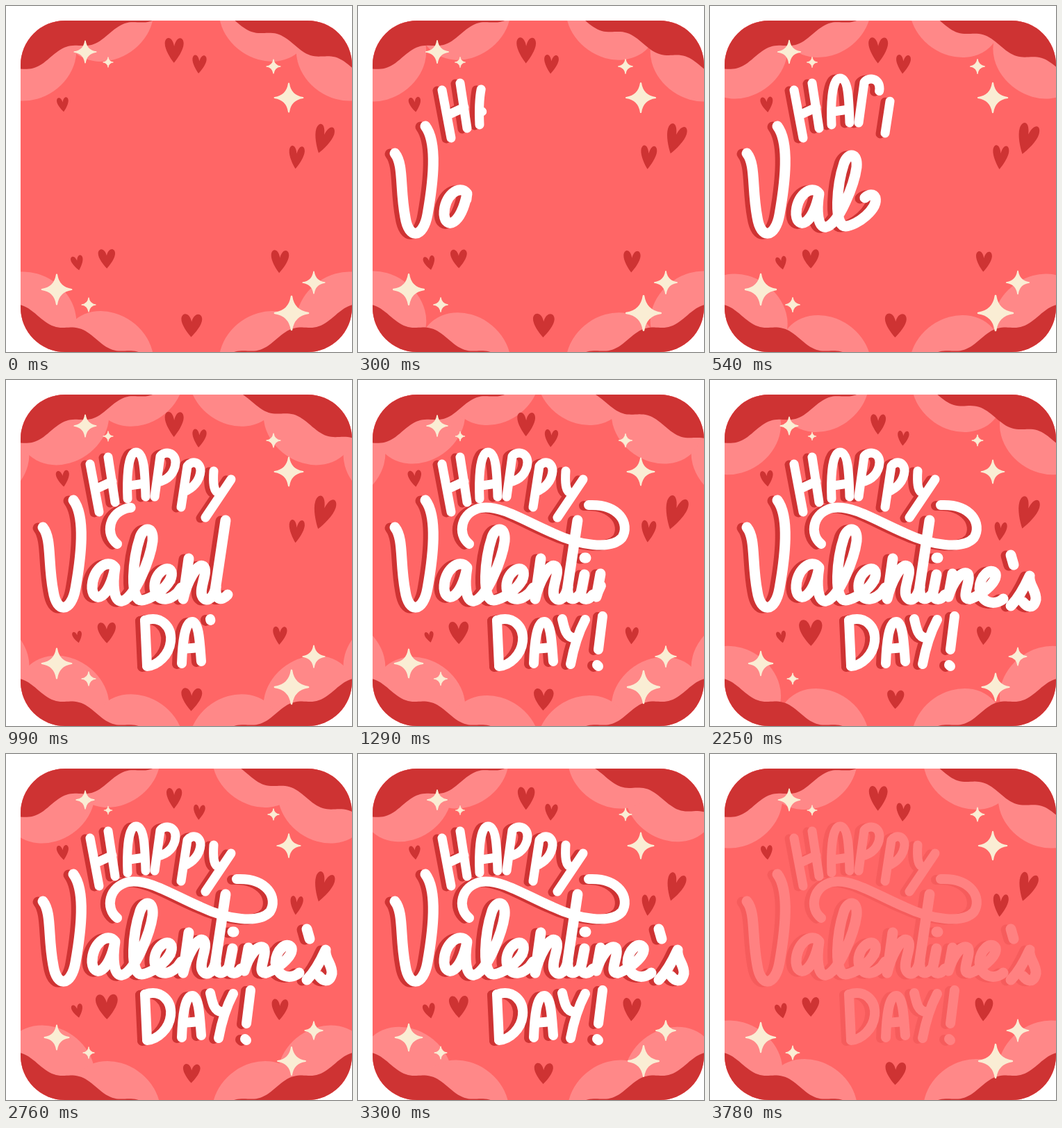
Write an HTML page that moves like this. It is 498 px wide and 498 px high and loops after 3.84 s.

```html
<!DOCTYPE html>
<html lang="en">
<head>
<meta charset="utf-8">
<title>Happy Valentine's Day</title>
<style>
html, body { margin: 0; height: 100%; overflow: hidden; background: #fff; }
svg { display: block; width: 498px; height: 498px; }
</style>
</head>
<body>
<svg viewBox="0 0 498 498">
  <defs>
    <clipPath id="card"><rect x="21" y="21" width="477" height="477" rx="64"/></clipPath>
    <g id="ink"></g>
  </defs>
  <g clip-path="url(#card)">
    <rect width="498" height="498" fill="#ff6666"/>
    <g id="corners"></g>
    <g id="hearts" fill="#ce3333"></g>
    <g id="stars" fill="#faedd4" stroke="#faedd4" stroke-width=".1" stroke-linejoin="round"></g>
  </g>
  <g id="lettering" fill="none" stroke-linecap="round" stroke-linejoin="round">
    <use href="#ink" x="-7" y="1" stroke="#ce3333"/>
    <use href="#ink" stroke="#fff"/>
  </g>
</svg>
<script>
const LOOP = 3840;
const FADE = 335;

const $ = id => document.getElementById(id);
function add(parent, tag, attrs) {
  const el = document.createElementNS('http://www.w3.org/2000/svg', tag);
  for (const name in attrs) el.setAttribute(name, attrs[name]);
  return parent.appendChild(el);
}

// Swings between -1 and 1, highest at `peak` ms
const sway = (t, peak, period = LOOP) => Math.cos((t - peak) * 2 * Math.PI / period);
const slow = t => sway(t, 1400);
const quick = t => sway(t, 1200, LOOP / 2);

// Scallops drift along the diagonal of each corner; all corners mirror the top left one
const nearDrift = t => 24 * quick(t) + 8 * slow(t);
const farDrift = t => 8 * quick(t) + 22 * slow(t);
const LOBES = [
  { x: -57, y: 125, drift: nearDrift },
  { x: 58, y: 68, drift: nearDrift },
  { x: 167, y: 12, drift: farDrift }
];
const corners = [
  { flip: '1 0 0 1 0 0', depth: 91, crest: () => 43 },
  { flip: '-1 0 0 1 519 0', depth: 89, crest: t => 72 - 16 * quick(t) },
  { flip: '1 0 0 -1 0 519', depth: 83, crest: () => 25 },
  { flip: '-1 0 0 -1 519 519', depth: 83, crest: () => 25 }
].map(corner => {
  const g = add($('corners'), 'g', { transform: `matrix(${corner.flip})` });
  const lobes = LOBES.map(() => add(g, 'ellipse', { rx: 69, ry: 58, fill: '#ff8888' }));
  return { ...corner, lobes, dark: add(g, 'path', { fill: '#ce3333' }) };
});

function wavePath(depth, crest) {
  let d = 'M0 0';
  for (let x = 0; x <= 240; x += 3) {
    const y = depth - 0.4 * (x - 21) + 6 * Math.cos((x - crest) * 2 * Math.PI / 84);
    d += `L${x} ${y.toFixed(1)}`;
  }
  return d + 'V0Z';
}

// Size over time, shared by groups of hearts and stars
const twinkle = t => 0.89 + 0.11 * sway(t, 500);
const swell = t => 1.19 + 0.2 * sway(t, 2250);
const dip = t => 1.02 + 0.17 * sway(t, 3500);
const flutter = t => 1 + 0.09 * sway(t, 1500);

const HEART = 'M0 .5C-.2 .32-.5-.04-.5-.28C-.5-.57-.12-.62 0-.17C.12-.62 .5-.57 .5-.28C.5-.04 .2 .32 0 .5Z';
const STAR = 'M0-.96Q.12-.12 .96 0Q.12 .12 0 .96Q-.12 .12-.96 0Q-.12-.12 0-.96Z';

const sprites = [];
function sprite(layer, d, pulse, x, y, w, h = w, tilt = 0) {
  sprites.push({ el: add($(layer), 'path', { d }), pulse, x, y, w, h, tilt });
}
const heart = (...args) => sprite('hearts', HEART, ...args);
const star = (...args) => sprite('stars', STAR, twinkle, ...args);

heart(twinkle, 242, 64, 28, 37, 1);
heart(twinkle, 278, 84, 21, 27, 4);
heart(twinkle, 418, 218, 23, 34, 5);
heart(twinkle, 267, 460, 31, 34, 2);
heart(flutter, 82, 142, 18, 22, -6);
heart(flutter, 456, 192, 29, 44, 17);
heart(dip, 103, 370, 15, 18, -12);
heart(dip, 394, 368, 22, 28, 3);
heart(swell, 145, 364, 24, 27, -1);

star(114, 66, 17);
star(147, 81, 8);
star(385, 87, 11);
star(407, 132, 22);
star(73, 408, 23);
star(119, 430, 11);
star(443, 398, 17);
star(411, 442, 26);

// Writes paths one after another: `speed` in px per ms, `step` is the share
// of a stroke that is drawn before the next one begins.
const strokes = [];
function write({ width, start, speed, step = 1 }, paths) {
  for (const d of paths) {
    const el = add($('ink'), 'path', { d, 'stroke-width': width });
    const length = el.getTotalLength();
    strokes.push({ el, start, speed, length });
    start += step * length / speed;
  }
}

// Happy
write({ width: 13, start: 40, speed: .42, step: .36 }, [
  'M121 121L134 190',
  'M147 111L157 176',
  'M129 157L153 146',
  'M175 171C174 150 174 104 187 104C200 104 200 140 201 168',
  'M178 152L199 149',
  'M214 168L222 110C228 102 244 103 244 119C243 133 234 144 218 147',
  'M252 183L261 124C268 115 280 118 280 131C279 145 269 156 256 161',
  'M287 198L324 143',
  'M299 131C298 145 298 162 307 162'
]);
// Valent
write({ width: 15, start: 20, speed: 1.5 }, [
  'M53 212C66 228 60 262 68 304C73 337 94 334 100 300C108 255 115 197 97 173',
  'M157 270C146 255 123 274 124 300C126 322 148 316 157 270C153 295 155 320 167 318' +
    'C186 314 208 255 211 232C213 211 199 210 193 226C183 256 177 316 195 317' +
    'C212 316 242 292 238 276C233 264 212 279 214 300C217 322 240 319 252 299',
  'M263 257L255 315C260 292 275 263 284 268C292 275 278 299 282 310C286 321 298 317 302 298',
  'M316 202L302 296C300 317 310 319 319 309'
]);
// Swash
write({ width: 14, start: 940, speed: 1.4 }, [
  'M160 236C142 222 148 190 177 184C206 180 238 202 280 220C318 238 364 245 380 227' +
    'C392 207 376 178 332 180'
]);
// ine's
write({ width: 15, start: 1130, speed: .65 }, [
  'M326 280L321 306C321 319 333 317 338 309',
  'M326 256h2',
  'M349 279L343 312C349 292 362 273 371 279C377 288 359 317 374 315',
  'M374 315C388 311 414 292 411 279C404 268 388 283 388 300C390 322 410 325 422 315',
  'M433 252L437 266',
  'M433 325C445 313 455 293 460 282C458 294 470 303 469 316C466 329 457 328 451 320'
]);
// Day!
write({ width: 14, start: 665, speed: 1 }, [
  'M200 346L203 411',
  'M200 346C224 338 239 356 237 376C235 396 218 411 203 412',
  'M253 408C254 380 257 348 268 348C278 348 279 380 281 405',
  'M256 387L278 385',
  'M294 344C297 358 300 372 312 371',
  'M327 345C318 362 311 382 306 409',
  'M352 340L346 388',
  'M344 410l2 2'
]);

function draw(t) {
  for (const { lobes, dark, depth, crest } of corners) {
    lobes.forEach((lobe, i) => {
      const { x, y, drift } = LOBES[i];
      const dx = drift(t);
      lobe.setAttribute('transform', `translate(${x + dx} ${y - 0.3 * dx}) rotate(-35)`);
    });
    dark.setAttribute('d', wavePath(depth, crest(t)));
  }
  for (const { el, pulse, x, y, w, h, tilt } of sprites) {
    const k = pulse(t);
    el.setAttribute('transform', `translate(${x} ${y}) rotate(${tilt}) scale(${w * k} ${h * k})`);
  }
  for (const { el, start, speed, length } of strokes) {
    const drawn = (t - start) * speed;
    el.setAttribute('visibility', drawn > 0 ? 'visible' : 'hidden');
    el.setAttribute('stroke-dasharray', drawn < length ? `${Math.max(0, drawn)} ${length + 20}` : 'none');
  }
  $('lettering').setAttribute('opacity', Math.min(1, (LOOP - t) / FADE));
}

const began = performance.now();
function tick() {
  draw((performance.now() - began) % LOOP);
  requestAnimationFrame(tick);
}
tick();
</script>
</body>
</html>
```
